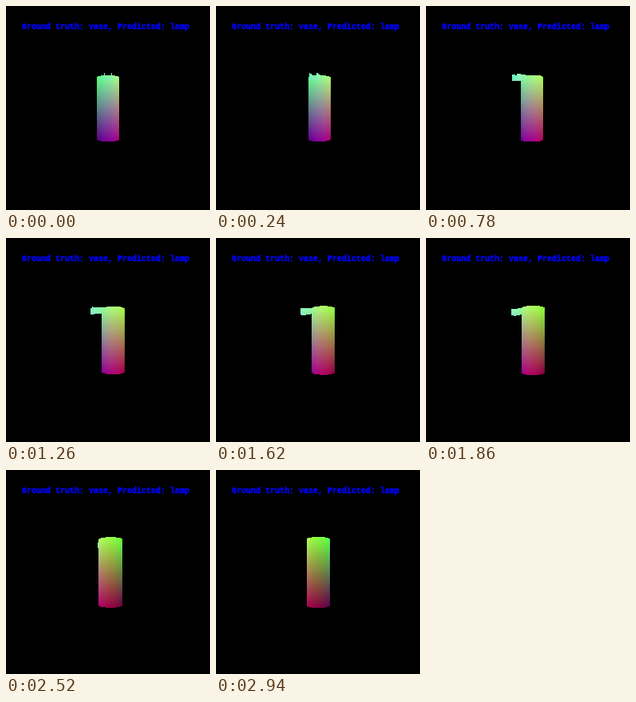
An HTML page with a canvas for the animation above (3 s loop, 256x256 px).

```html
<!DOCTYPE html>
<html lang="en">
<head>
<meta charset="utf-8">
<title>Rotating vase</title>
<style>
  html, body { margin: 0; width: 100%; height: 100%; overflow: hidden; background: #000; }
  canvas { position: absolute; left: 0; top: 0; }
  p {
    position: absolute; left: 20px; top: 21px; margin: 0;
    font: bold 10px/12px "Liberation Mono", monospace;
    color: #00f; white-space: pre;
    -webkit-text-stroke: 0.4px #00f;
  }
</style>
</head>
<body>
<canvas width="256" height="256"></canvas>
<p>Ground truth: vase, Predicted: lamp</p>
<script>
const SIZE = 256, MID_X = 128, MID_Y = 128.5, CAMERA = 200;
const STEP = 60, FRAMES = 50;
const RADIUS = 13.9, HALF = 39.5, AXIS = -6.5;
const LIP = 4.3, LIP_TOP = -39.6, LIP_START = 6, LIP_END = 20.7;

const ctx = document.querySelector("canvas").getContext("2d");
const image = ctx.createImageData(SIZE, SIZE);
const pixels = new Uint32Array(image.data.buffer);
const depth = new Float32Array(SIZE * SIZE);
const points = [];

// Each point is coloured by its position: x is red, height green, z blue.
const channel = v => Math.max(0, Math.min(255, Math.round(128 + 3.2 * v)));

function surface(rows, cols, place) {
  for (let i = 0; i <= rows; i++) {
    for (let j = 0; j <= cols; j++) {
      const [x, y, z] = place(i / rows, j / cols);
      const color = (255 << 24 | channel(z) << 16 | channel(-y) << 8 | channel(x)) >>> 0;
      points.push({ x, y, z, color });
    }
  }
}

const along = u => LIP_START + u * (LIP_END - LIP_START);
const floorY = u => -35 + 2 * u;

// Body
surface(180, 240, (u, v) => {
  const a = v * 2 * Math.PI;
  return [RADIUS * Math.sin(a), HALF * (2 * u - 1), AXIS + RADIUS * Math.cos(a)];
});
// Open spout: two side walls and a floor
for (const side of [-LIP, LIP]) {
  surface(40, 30, (u, v) => [side, LIP_TOP + v * (floorY(u) - LIP_TOP), along(u)]);
}
surface(40, 30, (u, v) => [LIP * (2 * v - 1), floorY(u), along(u)]);

function render(frame) {
  const angle = Math.PI * frame / FRAMES;
  const sin = Math.sin(angle), cos = Math.cos(angle);
  pixels.fill(0xff000000);
  depth.fill(-Infinity);
  for (const { x, y, z, color } of points) {
    const near = z * cos + x * sin;
    const scale = CAMERA / (CAMERA - near);
    const px = Math.floor(MID_X + (x * cos - z * sin) * scale);
    const py = Math.floor(MID_Y + y * scale);
    const at = py * SIZE + px;
    if (near > depth[at]) {
      depth[at] = near;
      pixels[at] = color;
    }
  }
  ctx.putImageData(image, 0, 0);
}

let shown = -1;
function tick() {
  const frame = Math.floor(performance.now() / STEP) % FRAMES;
  if (frame !== shown) render(shown = frame);
  requestAnimationFrame(tick);
}
tick();
</script>
</body>
</html>
```
